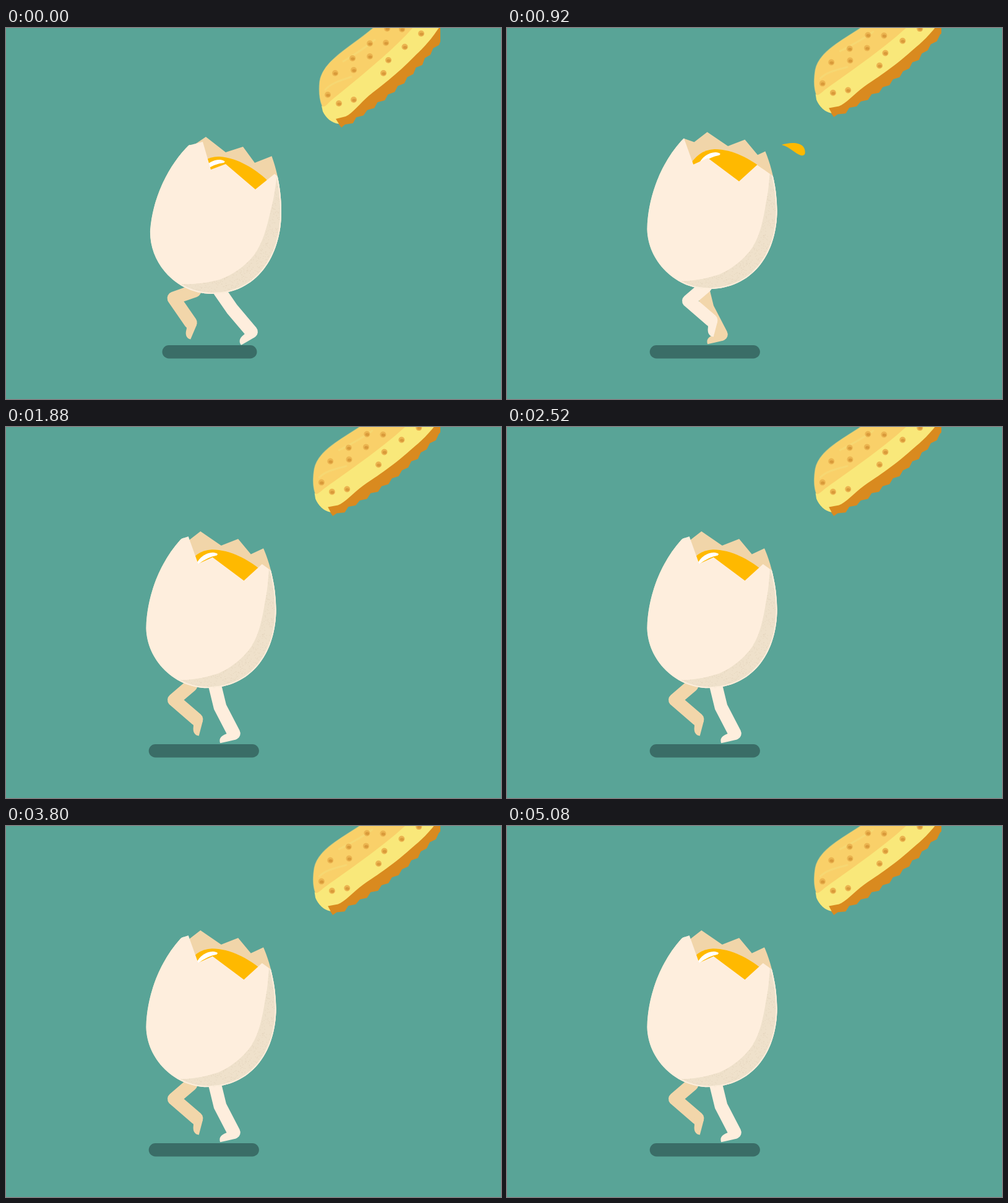
Animation, 800 px wide and 600 px high, one loop 5.12 s. Source, as an HTML page:

```html
<!DOCTYPE html>
<html lang="en">
<head>
<meta charset="utf-8">
<title>Running egg</title>
<style>
html, body { margin: 0; width: 100%; height: 100%; overflow: hidden; background: #59a497; }
svg { display: block; width: 100vw; height: 100vh; }
</style>
</head>
<body>
<svg viewBox="0 0 800 600">
  <defs>
    <path id="egg" d="M233 327C237 275 262 222 297 188C330 155 405 150 429 206C438 230 445 262 445 297C445 370 405 430 333 430C275 430 231 380 233 327Z"/>
    <path id="shade" d="M438 237C435 262 432 280 428 294C421 325 415 347 401 367C386 386 365 400 345 407C322 413 303 415 280 414L300 440H460V237Z"/>
    <clipPath id="inEgg"><use href="#egg"/></clipPath>
    <clipPath id="inShade"><use href="#shade"/></clipPath>
    <clipPath id="frontCut">
      <path id="front" d="M200 216L295 190L318 184L331 229L355 220L403 261L434 236L500 290L560 500H150Z"/>
    </clipPath>
    <clipPath id="breadCut"><path d="M0 0H702V600H0Z"/></clipPath>
  </defs>
  <rect width="800" height="600" fill="#59a497"/>
  <rect id="shadow" y="513" height="21.5" rx="10.7" fill="#3a6d67"/>

  <g clip-path="url(#breadCut)">
    <g id="bread">
      <path id="crust" fill="#d98a1f"/>
      <path fill="#f9d069" stroke="#e9d57c" stroke-opacity=".55" stroke-width="1.5" d="M596 -2C574 17 550 32 533 47C519 59 509 72 507 87C505 108 508 122 514 132L560 110L700 -2L740 -80L690 -70Z"/>
      <path fill="#f9e87a" d="M510 126C516 130 519 122 528 115C545 101 565 85 586 67C610 47 640 20 657 0L727 -66L755 -60L698 2C682 26 668 38 660 46C632 75 602 97 587 109C572 122 560 138 549 143L533 147L538 155C526 154 517 145 512 135Z"/>
      <path fill="none" stroke="#f5dc78" stroke-width="3" stroke-opacity=".6" stroke-linecap="round" d="M516 100C525 89 543 84 558 79M545 54C563 43 580 33 596 19"/>
      <g id="holes"></g>
    </g>
  </g>

  <g id="tan" fill="#f2d6aa" stroke="#f2d6aa"></g>
  <g id="cream" fill="#feeedd" stroke="#feeedd"></g>

  <g id="body">
    <g clip-path="url(#inEgg)">
      <path id="back" fill="#f1d5a9" d="M240 165L275 180L301 191L323 176L355 201L383 192L402 218L430 207L470 250V330H240Z"/>
      <g id="yolk">
        <path fill="#ffb900" d="M300 236Q318 207 345 208C375 210 402 228 421 245L440 290H300Z"/>
        <path fill="#fff" d="M318 230Q328 213 346 213Q357 215 352 218Q338 219 320 231Z"/>
      </g>
      <g clip-path="url(#frontCut)">
        <use href="#egg" fill="#feeedd"/>
        <use href="#shade" fill="#efe1cb"/>
        <path id="grain" fill="#d9c8ae" fill-opacity=".5" clip-path="url(#inShade)"/>
        <use href="#egg" fill="none" stroke="#fdeedc" stroke-width="4"/>
      </g>
    </g>
  </g>
  <path id="drop" fill="#ffb900" d="M444 189C455 185 477 183 481 196C483 204 481 207 475 206C465 203 457 192 444 189Z"/>
</svg>
<script>
const $ = id => document.getElementById(id);
const set = (id, attrs) => { for (const k in attrs) $(id).setAttribute(k, attrs[k]); };
const { PI, sin, cos, atan2, acos, hypot, min, abs, sqrt } = Math;

let seed = 7;
const rnd = () => (seed = seed * 16807 % 2147483647) / 2147483647;

function buildBread() {
  let d = 'M530 146L542 161';
  for (let i = 0; i <= 20; i++) {
    const t = i / 20, bow = 7 * sin(PI * t), bump = i % 2 * 3 - 1 + rnd();
    d += `L${549 + 155 * t + bow + bump} ${157 - 140 * t + bow + bump}`;
  }
  set('crust', { d: d + 'L780 -72L700 -60Z' });

  // rows of holes: start, end, count
  const rows = [[532, 73, 616, 1, 4], [562, 68, 640, 2, 4], [618, 52, 671, 9, 3],
    [520, 108, 562, 116, 2], [538, 122, 610, 73, 2]];
  for (const [x1, y1, x2, y2, n] of rows) {
    for (let i = 0; i < n; i++) {
      const t = i / (n - 1), at = `translate(${x1 + (x2 - x1) * t} ${y1 + (y2 - y1) * t})`;
      $('holes').innerHTML += `<g transform="${at}"><circle r="5" fill="#ebb450"/>` +
        '<ellipse cx=".5" cy=".8" rx="3.2" ry="2.4" fill="#d99a3a"/></g>';
    }
  }
}

function buildGrain() {
  let d = '';
  for (let i = 0; i < 2200; i++) {
    d += `M${(280 + rnd() * 165).toFixed(1)} ${(237 + rnd() * 193).toFixed(1)}h1v1h-1z`;
  }
  set('grain', { d });
}

// Slow swing to the left for 12 steps, fast stance to the right for 4.
function footAt(p, lift) {
  if (p < 12) {
    const s = p / 12, arc = sin(PI * s);
    return [397 - 115 * s, 492 - 18 * arc - 2 * lift * arc, 150 + 25 * s - 62 * arc];
  }
  const t = (p - 12) / 4;
  return [282 + 115 * t, 492 + 5 * sin(PI * t), 175 - 25 * t ** 4];
}

const thigh = 36, shin = 48;

function drawLeg(id, p, dx, lift) {
  const hx = 336 + dx + 9 * cos(PI * p / 8) - 6.8 * lift, hy = 425 - 7 * lift;
  let [ax, ay, turn] = footAt(p, lift);
  ax += dx;
  const dir = atan2(ay - hy, ax - hx);
  const reach = min(hypot(ax - hx, ay - hy), thigh + shin - .1);
  ax = hx + reach * cos(dir);
  ay = hy + reach * sin(dir);
  const bend = dir + acos((thigh ** 2 + reach ** 2 - shin ** 2) / (2 * thigh * reach));
  const kx = hx + thigh * cos(bend), ky = hy + thigh * sin(bend);
  $(id).innerHTML =
    `<path d="M${hx} ${hy}L${kx} ${ky}L${ax} ${ay}" fill="none" stroke-width="21" stroke-linejoin="round" stroke-linecap="round"/>` +
    `<path transform="translate(${ax} ${ay}) rotate(${turn}) scale(1 -1)" stroke="none" d="M0 10.5H25C26 4 22 -1 12 -2L0 -6Z"/>`;
}

function draw(ms) {
  const p = Math.floor((ms + 1) / 40) % 16;
  const lift = 4 - abs(p % 8 - 4);
  const spin = 17 * sqrt(sin(PI * p / 16));

  const left = 252.5 - 21.8 * lift, right = 405.5 + 3.4 * lift;
  set('shadow', { x: left, width: right - left });
  set('bread', { transform: `rotate(${3.9 * lift} 785 -50)` });
  set('body', { transform: `translate(${-7.2 * lift} ${-7.8 * lift}) rotate(${-3.6 * lift} 335 320)` });
  set('front', { transform: `translate(${-spin} ${-.12 * spin})` });
  set('back', { transform: `translate(${spin} 0)` });
  set('yolk', { transform: `translate(${.3 * spin} ${-.2 * spin})` });
  drawLeg('tan', (p + 8) % 16, -22, lift);
  drawLeg('cream', p, 0, lift);

  const d = p - 7;
  set('drop', {
    transform: `translate(${22 * d} ${12 * d + 2.5 * d * d})`,
    visibility: abs(d) <= 2 ? 'visible' : 'hidden'
  });
}

function tick() {
  draw(performance.now() % 5120);
  requestAnimationFrame(tick);
}

buildBread();
buildGrain();
tick();
</script>
</body>
</html>
```
